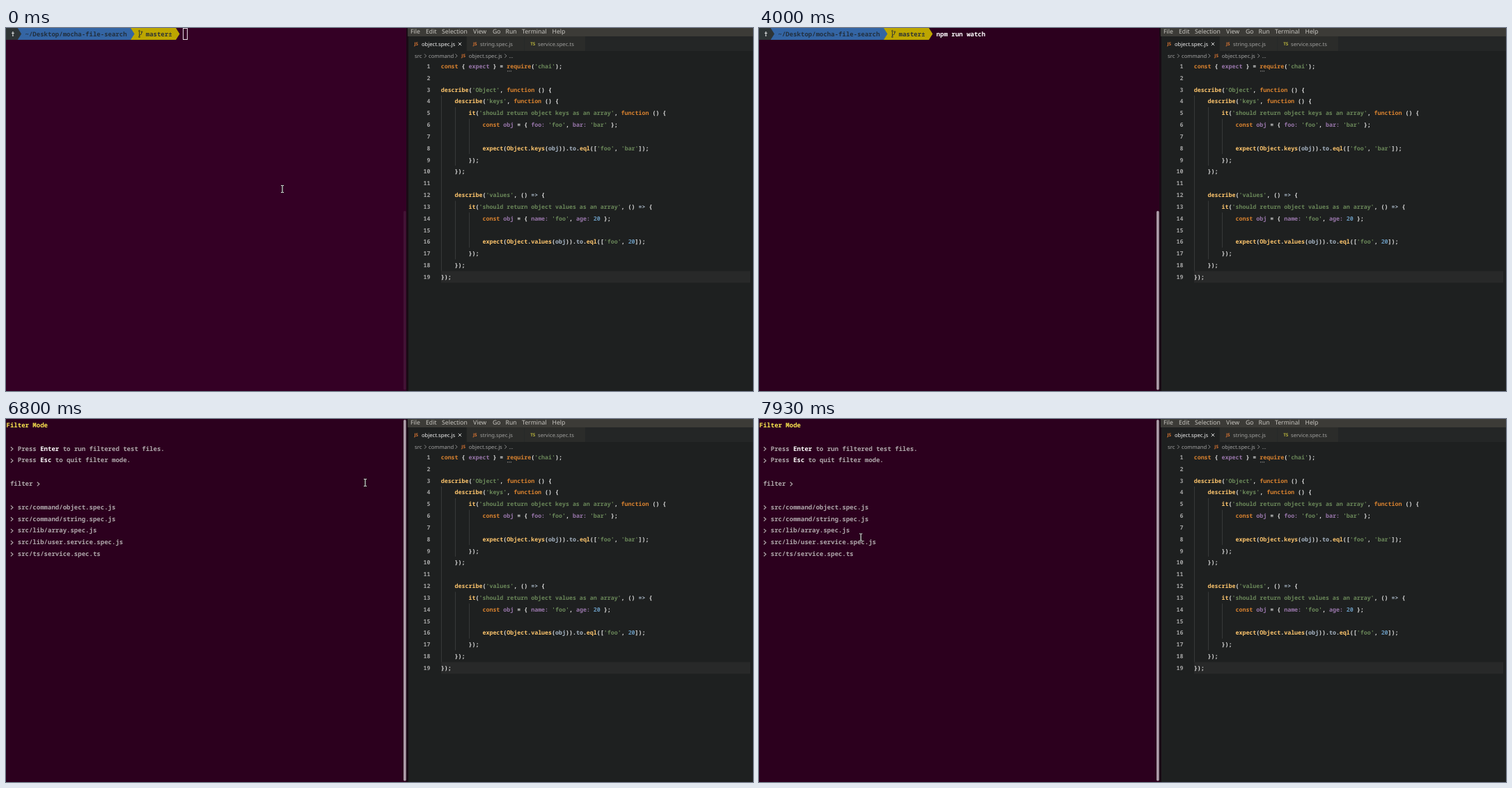
An HTML page that plays this animation: 1073x522 px, repeating every 8 s.

```html
<!DOCTYPE html>
<html lang="en">
<head>
<meta charset="utf-8">
<title>Terminal and editor</title>
<style>
  html, body { margin: 0; width: 100%; height: 100%; overflow: hidden; background: #1e2020; }
  svg { display: block; width: 100%; height: 100%; }
  text { white-space: pre; text-rendering: geometricPrecision; font-variant-ligatures: none; }
  .term { font: 600 9.02px "Noto Sans Mono", "DejaVu Sans Mono", monospace; }
  .code { font: 700 8.3px "Noto Sans Mono", "DejaVu Sans Mono", monospace; }
  .ui { font: 7.65px "Noto Sans", "Open Sans", sans-serif; }
  .menu { font-size: 8.7px; }
  .icon { font-weight: 700; font-size: 6.3px; }
</style>
</head>
<body>
<svg id="stage" viewBox="0 0 1073 522"></svg>
<script>
const LOOP = 8000, ROW = 16.83, TERM_CHAR = 5.412, CODE_CHAR = 4.98, CODE_X = 624.7;
const stage = document.getElementById('stage');

const rect = (x, y, w, h, fill, extra = '') =>
  `<rect x="${x}" y="${y}" width="${w}" height="${h}" fill="${fill}" ${extra}/>`;
const text = (x, y, body, cls, fill, extra = '') =>
  `<text x="${x}" y="${y}" class="${cls}" fill="${fill}" ${extra}>${body}</text>`;
const span = (body, fill, weight = 'inherit') =>
  `<tspan fill="${fill}" font-weight="${weight}">${body}</tspan>`;
const chevron = (x, y, w, h, stroke, width) =>
  `<path d="M${x} ${y - h / 2}l${w} ${h / 2}l${-w} ${h / 2}" fill="none" stroke="${stroke}" stroke-width="${width}"/>`;
const TERM_GREY = '#aea6aa';
const termX = col => .5 + col * TERM_CHAR;
const termText = (col, row, body, fill = TERM_GREY, extra = '') =>
  text(termX(col), 12 + row * ROW, body, 'term', fill, extra);
const termChevron = (col, row) => chevron(termX(col) + 1, 9.4 + row * ROW, 3, 5.6, TERM_GREY, 1.2);

// Shell prompt: each segment ends in a tip one character wide
const segment = (col, fill) => {
  const end = termX(col);
  return `<path d="M0 0H${end}L${end + TERM_CHAR} 8.5L${end} 17H0Z" fill="${fill}"/>`;
};
const prompt = `<g id="prompt">
  ${segment(45, '#bda600')}${segment(33, '#3465a4')}${segment(3, '#2e3436')}
  ${termText(1.25, 0, '†', '#fff', 'style="font-weight:700"')}
  ${termText(5, 0, '~/Desktop/mocha-file-search', '#22303f')}
  <g fill="none" stroke="#2e3436" stroke-width=".9">
    <path d="M191.5 5V12M191.5 10.5Q195 10 195 6.5"/>
    <circle cx="191.5" cy="4.3" r=".9"/><circle cx="195" cy="5.6" r=".9"/><circle cx="191.5" cy="12.7" r=".9"/>
  </g>
  ${termText(37, 0, 'master±', '#2e3436')}
</g>`;

// Filter screen
const strong = word => span(word, '#fff', 900);
const files = ['command/object.spec.js', 'command/string.spec.js', 'lib/array.spec.js',
  'lib/user.service.spec.js', 'ts/service.spec.ts'];
const filter = `<g id="filter">
  ${termText(0, 0, 'Filter Mode', '#fce94f', 'style="font-weight:900"')}
  ${termChevron(1, 2)}${termText(3, 2, `Press ${strong('Enter')} to run filtered test files.`)}
  ${termChevron(1, 3)}${termText(3, 3, `Press ${strong('Esc')} to quit filter mode.`)}
  ${termText(1, 5, 'filter')}${termChevron(8, 5)}
  ${files.map((file, i) => termChevron(1, 7 + i) + termText(3, 7 + i, 'src/' + file)).join('')}
</g>`;

const terminal = `
  ${rect(0, 0, 575, 522, '#2c001e', 'id="termBg"')}
  ${rect(575, 0, 3, 522, '#190b15')}
  ${rect(571, 263, 3.7, 257.5, '#aa9ca6', 'id="bar" rx="1.8"')}
  ${prompt}${filter}
  ${rect(0, 0, TERM_CHAR, 17, '#fff', 'id="cursor"')}
  ${termText(47, 0, '', '#fff', 'id="command"')}`;

// Editor
const source = `const { expect } = require('chai');

describe('Object', function () {
    describe('keys', function () {
        it('should return object keys as an array', function () {
            const obj = { foo: 'foo', bar: 'bar' };

            expect(Object.keys(obj)).to.eql(['foo', 'bar']);
        });
    });

    describe('values', () => {
        it('should return object values as an array', () => {
            const obj = { name: 'foo', age: 20 };

            expect(Object.values(obj)).to.eql(['foo', 20]);
        });
    });
});`.split('\n');

const syntax = [
  [/^'[^']*'/, '#6a8759'],
  [/^(const|function|require)\b/, '#d9822f', 900],
  [/^(\w+:|obj(?= =)|expect(?= \}))/, '#9876aa'],
  [/^(describe|it|expect|Object|keys|values|eql)\b/, '#ffc66d'],
  [/^\d+/, '#6897bb'],
  [/^(\w+|=>)/, '#a9b7c6'],
  [/^([^\w'=]+|=)/, '#e4e4e4']
];
function highlight(line) {
  let out = '';
  while (line) {
    const [pattern, fill, weight] = syntax.find(([p]) => p.test(line));
    const token = line.match(pattern)[0];
    out += span(token.replace('>', '&gt;'), fill, weight);
    line = line.slice(token.length);
  }
  return out;
}
const codeLines = source.map((line, i) => {
  const y = 57.9 + i * ROW, indent = line.search(/\S|$/);
  return text(609.5, y, i + 1, 'code', '#a3a3a3', 'text-anchor="end"') +
    text(CODE_X + indent * CODE_CHAR, y, highlight(line.trim()), 'code', '#e4e4e4');
}).join('');

const guide = (level, from, to) =>
  rect(625 + level * 20, 46.5 + (from - 1) * ROW, 1, (to - from + 1) * ROW, '#373939');
const ui = (x, y, body, fill = '#a2a2a2', cls = '') => text(x, y, body, 'ui ' + cls, fill);
const icon = (x, y, body) => ui(x, y, body, body === 'JS' ? '#dc7633' : '#b9b43c', 'icon');
const crumb = x => chevron(x, 40.1, 2.6, 5.4, '#a2a2a2', .8);
const menu = { File: 581, Edit: 603, Selection: 626, View: 671, Go: 699, Run: 717.5, Terminal: 741, Help: 784.5 };

const editor = `
  ${rect(578, 0, 495, 522, '#1e2020')}
  ${rect(577, 0, 496, 12, '#3c3b37')}
  ${rect(578, 12, 495, 21, '#242626')}
  ${rect(578, 12, 83.5, 21, '#1e2020')}
  ${rect(662, 12, 82.5, 21, '#2b2c2a')}${rect(745, 12, 87, 21, '#2b2c2a')}
  ${Object.entries(menu).map(([label, x]) => ui(x, 8, label, '#c9c7c2', 'menu')).join('')}
  ${icon(586.5, 25.4, 'JS')}${ui(597, 25.8, 'object.spec.js', '#f2f2f2')}
  <path d="M649.8 20.8l4.4 4.4m0-4.4l-4.4 4.4" stroke="#e8e8e8" stroke-width=".9"/>
  ${icon(671, 25.4, 'JS')}${ui(681, 25.8, 'string.spec.js', '#a0a09e')}
  ${icon(753.2, 25.4, 'TS')}${ui(764, 25.8, 'service.spec.ts', '#a0a09e')}
  ${ui(587, 42.8, 'src')}${crumb(601)}${ui(607, 42.8, 'command')}${crumb(645.5)}
  ${icon(654.3, 42.4, 'JS')}${ui(664.7, 42.8, 'object.spec.js')}${crumb(716.3)}${ui(722.5, 42.8, '…')}
  ${rect(625, 349.5, 444, 16.8, '#282929')}
  ${guide(0, 4, 18)}${guide(1, 5, 9)}${guide(1, 13, 17)}${guide(2, 6, 8)}${guide(2, 14, 16)}
  ${codeLines}
  <path d="M720 62h6" stroke="#a9a9a9" stroke-dasharray="1.2 1.2"/>
  <circle id="hint" cx="586.5" cy="55" r="2.2" fill="#611b1b"/>`;

// Pointers are drawn around their own centre
const beam = 'M-2-5H-.7L0-4.4L.7-5H2M0-4.4V4.4M-2 5H-.7L0 4.4L.7 5H2';
const pointers = `
  <g id="beam" fill="none">
    <path d="${beam}" stroke="#222" stroke-width="2.2"/>
    <path d="${beam}" stroke="#eee" stroke-width="1"/>
  </g>
  <path id="hand" fill="#fff" stroke="#111" stroke-width=".8" stroke-linejoin="round"
    d="M-2.2 1.3V-3.8Q-1.3-5.2-.4-3.8V-.8Q.6-1.6 1.4-.6Q2.3-1.2 3-.2Q4.3-.5 4.6.8V3Q4 4.2 3.7 5.4H-1.2Q-1.8 3.8-4 1.5Q-3.8.2-2.2 1.3Z"/>`;

stage.innerHTML = terminal + editor + pointers;
const el = Object.fromEntries([...stage.querySelectorAll('[id]')].map(node => [node.id, node]));

// Step tables: [start time, values...]
const steps = {
  focus: [[0, '#340025', .12], [800, '#300022', .6], [870, '#2c001e', 1]],
  screen: [[0, 'prompt'], [4930, 'blank'], [5200, 'filter']],
  typed: [[0, 0, 0], [2330, 1, 13], [2470, 2, 13], [3270, 13, 13]],
  // column, row, style
  cursor: [
    [0, 47, 0, 'hollow'], [870, 47, 0, 'solid'], [1330, 47, 0, 'off'], [1930, 47, 0, 'solid'],
    [2330, 48, 0, 'solid'], [2470, 49, 0, 'solid'], [3270, 60, 0, 'solid'], [4000, 60, 0, 'off'],
    [4470, 60, 0, 'solid'], [4800, 0, 1, 'solid'], [4930, 0, 0, 'solid'], [5200, 10, 5, 'off'],
    [5800, 10, 5, 'solid'], [6400, 10, 5, 'off'], [7070, 10, 5, 'solid'], [7600, 10, 5, 'off']
  ],
  // shape, x, y
  pointer: [
    [0, 'beam', 397, 231.5], [400, 'beam', 274.3, 216.5], [600, 'beam', 237.5, 158.5],
    [1070, 'beam', 301.5, 224.5], [2070, 'none', 0, 0],
    [6600, 'beam', 390.5, 159.5], [6730, 'beam', 451, 125], [6800, 'beam', 516, 91.5],
    [6870, 'beam', 587, 60], [6930, 'hand', 643, 41], [7070, 'hand', 636, 34],
    [7200, 'hand', 629, 29], [7270, 'hand', 624.5, 27],
    [7670, 'hand', 598, 40], [7800, 'beam', 360, 110], [7930, 'beam', 146.3, 170]
  ],
  hint: [[0, false], [6870, true], [7670, false]]
};
const at = (name, time) => steps[name].findLast(step => step[0] <= time).slice(1);
const set = (node, attrs) => {
  for (const key in attrs) node.setAttribute(key, attrs[key]);
};
const show = (node, visible) => { node.style.display = visible ? '' : 'none'; };

function draw(time) {
  const [background, barOpacity] = at('focus', time);
  const [screen] = at('screen', time);
  const atPrompt = screen === 'prompt';
  set(el.termBg, { fill: background });
  set(el.bar, { opacity: barOpacity, y: atPrompt ? 263 : 1, height: atPrompt ? 257.5 : 519.5 });
  show(el.prompt, atPrompt);
  show(el.command, atPrompt);
  show(el.filter, screen === 'filter');

  // The rest of the command is suggested in grey until accepted
  const [typed, shown] = at('typed', time);
  const command = 'npm run watch';
  el.command.innerHTML = span(command.slice(0, typed), '#fff') + span(command.slice(typed, shown), '#756b74');

  const [col, row, style] = at('cursor', time);
  const hollow = style === 'hollow', inset = hollow ? .5 : 0;
  show(el.cursor, style !== 'off');
  set(el.cursor, {
    x: Math.round(termX(col)) + inset - hollow, y: Math.round(row * ROW) + inset,
    width: TERM_CHAR + inset, height: 17 - 2 * inset,
    fill: hollow ? 'none' : '#fff', stroke: hollow ? '#e8dfe6' : 'none'
  });

  const [shape, px, py] = at('pointer', time);
  for (const name of ['beam', 'hand']) {
    show(el[name], name === shape);
    set(el[name], { transform: `translate(${px} ${py})` });
  }
  show(el.hint, at('hint', time)[0]);
}

const start = performance.now();
function tick() {
  draw((performance.now() - start) % LOOP);
  requestAnimationFrame(tick);
}
tick();
</script>
</body>
</html>
```
